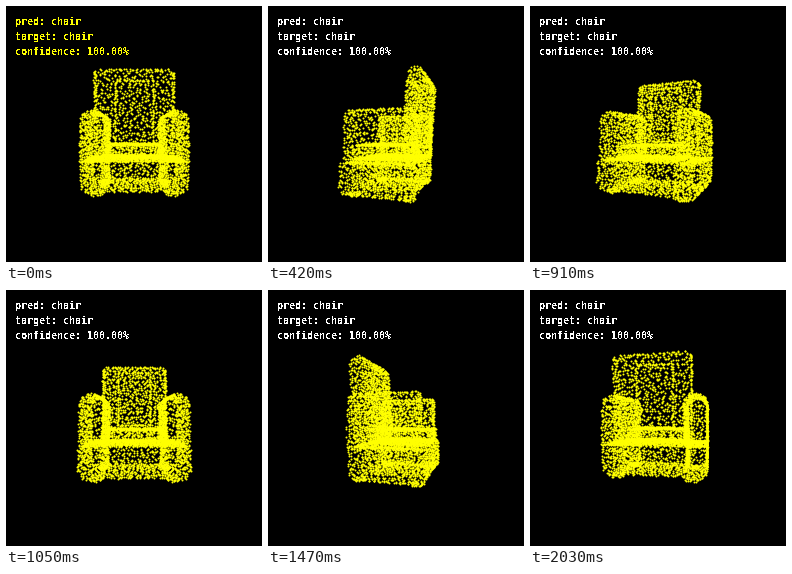
Write a matplotlib script that moves like this. It is 256 by 256 pixels and loops after 2100 ms.

```python
import numpy as np
import matplotlib.pyplot as plt
from matplotlib.animation import FuncAnimation
from matplotlib.path import Path

SIZE, FRAMES, STEP_MS = 256, 30, 70
CENTER, CAMERA = 128, 220
GAP = 3.75
YELLOW = "#ffff00"
rng = np.random.default_rng(7)


def jittered(w, h):
    """Evenly scattered points over a w by h rectangle."""
    nu, nv = max(1, round(w / GAP)), max(1, round(h / GAP))
    u, v = np.meshgrid(np.arange(nu), np.arange(nv))
    u = (u + rng.uniform(0, 1, u.shape)) * w / nu
    v = (v + rng.uniform(0, 1, v.shape)) * h / nv
    return u.ravel(), v.ravel()


def extrude(outline, lo, hi, caps=True):
    """Points on a prism: columns are outline a, outline b, depth."""
    loop = np.vstack([outline, outline[:1]]).astype(float)
    dist = np.r_[0, np.cumsum(np.hypot(*np.diff(loop, axis=0).T))]
    s, depth = jittered(dist[-1], hi - lo)
    parts = [np.c_[np.interp(s, dist, loop[:, 0]),
                   np.interp(s, dist, loop[:, 1]), depth + lo]]
    if caps:
        corner = loop.min(axis=0)
        for end in (lo, hi):
            ab = np.c_[jittered(*np.ptp(loop, axis=0))] + corner
            ab = ab[Path(loop).contains_points(ab)]
            parts.append(np.c_[ab, np.full(len(ab), end)])
    return np.vstack(parts)


def rect(a0, a1, b0, b1):
    return np.array([(a0, b0), (a1, b0), (a1, b1), (a0, b1)])


def arc(a, b, ra, rb, start, stop):
    t = np.radians(np.linspace(start, stop, 11))
    return np.c_[a + ra * np.cos(t), b + rb * np.sin(t)]


def sweep_x(profile, half, caps=True):
    """Sweep a (z, y) profile across the width of the chair."""
    return extrude(profile, -half, half, caps)[:, ::-1]


def mirror(p):
    return p * (-1, 1, 1)


def build_chair():
    back = sweep_x(np.vstack([[(16, -10)], arc(27, 46, 7, 11, 180, 0),
                              [(29, -24), (18, -24)]]), 34.4)
    edge = np.clip(np.abs(back[:, 0]) - 29, 0, None)
    back[:, 1] = np.minimum(back[:, 1], 57 - 0.15 * edge ** 2)

    panel = extrude(rect(-17.3, 17.3, -8, 49), 15, 21, caps=False)
    cushion = sweep_x(rect(-36, 17, -23, -10.5), 27)
    middle = sweep_x(rect(-35, 26, -51, -24), 27, caps=False)

    arm = extrude(np.vstack([arc(37.5, 11, 10.5, 10.5, 0, 180),
                             [(29, -24), (48, -24)]]), -31, 28)
    side = extrude(np.vstack([[(48, -25), (30, -25), (28, -52)],
                              arc(40, -44, 7.5, 8.5, -90, 0)]), -36, 27)
    foot = np.vstack([extrude(rect(29, 39, -54.5, -52), z, z + 8)
                      for z in (-33, 18)])

    parts = [back, panel, cushion, middle]
    for p in (arm, side, foot):
        parts += [p, mirror(p)]
    return np.vstack(parts)


def project(points, angle):
    x, y, z = points.T
    c, s = np.cos(angle), np.sin(angle)
    scale = CAMERA / (CAMERA + x * s - z * c)
    return np.c_[CENTER + (x * c + z * s) * scale, CENTER - y * scale]


chair = build_chair()

plt.rcParams["text.antialiased"] = False
fig = plt.figure(figsize=(SIZE / 100, SIZE / 100), dpi=100, facecolor="black")
ax = fig.add_axes([0, 0, 1, 1])
ax.set(xlim=(0, SIZE), ylim=(SIZE, 0))
ax.axis("off")

px = 72 / fig.dpi
cloud = ax.scatter(*project(chair, 0).T, s=(2 * px) ** 2, c=YELLOW,
                   linewidths=0)
labels = [
    ax.text(9, 19 + 15 * i, line, family="DejaVu Sans Mono", weight="bold",
            size=10 * px, va="baseline")
    for i, line in enumerate(["pred: chair", "target: chair",
                              "confidence: 100.00%"])
]


def update(i):
    cloud.set_offsets(project(chair, 2 * np.pi * i / FRAMES))
    for label in labels:
        label.set_color(YELLOW if i == 0 else "white")
    return [cloud, *labels]


anim = FuncAnimation(fig, update, frames=FRAMES, interval=STEP_MS,
                     repeat=True, repeat_delay=0)
plt.show()
```
